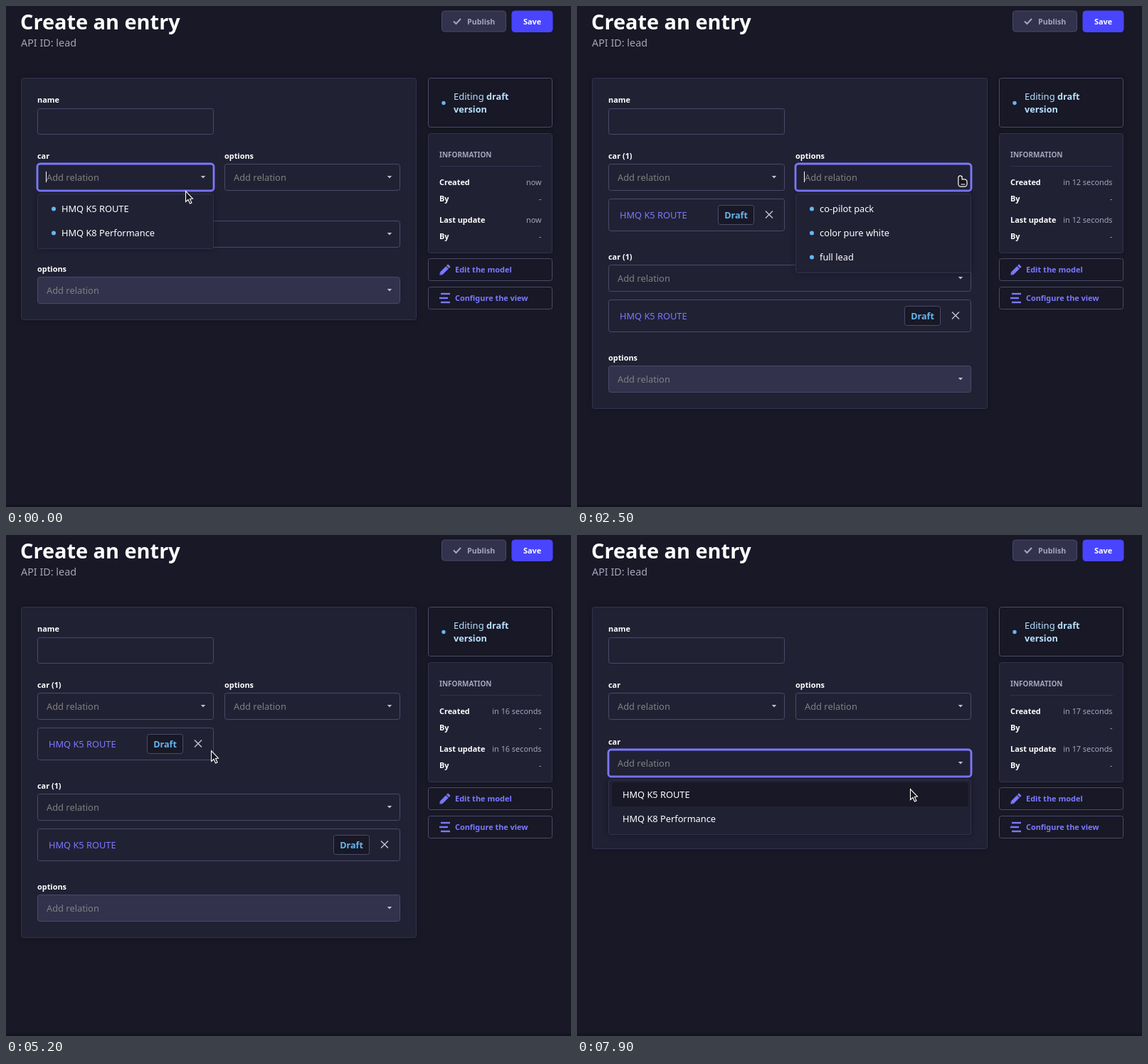
An HTML page with a canvas for the animation above (8000 ms loop, 794 by 705 pixels).

```html
<!DOCTYPE html>
<html lang="en">
<head>
<meta charset="utf-8">
<title>Create an entry</title>
<style>
html, body { margin: 0; width: 100%; height: 100%; overflow: hidden; background: #181826; }
canvas { display: block; }
</style>
</head>
<body>
<canvas id="stage" width="794" height="705"></canvas>
<script>
const ctx = document.getElementById('stage').getContext('2d');
const LOOP = 8000, STEP = 100, GLIDE = 500;
const C = {
  page: '#181826', card: '#212134', line: '#32324d', edge: '#4a4a6a', hint: '#808080',
  soft: '#a5a5ba', icon: '#c0c0cf', white: '#ffffff', violet: '#7b79ff', blue: '#66b7f1',
  save: '#4945ff', pale: '#b8e1ff', ink: '#16161c'
};
const CARS = ['HMQ K5 ROUTE', 'HMQ K8 Performance'];
const OPTIONS = ['co-pilot pack', 'color pure white', 'full lead'];

// Form grid
const LEFT = 44, SECOND = 307, RIGHT = 554, TOP = 222;
const FIELD_H = 38, ROW = 79.5, CHIP_ROW = 62.5, CHIP_DROP = 49, ITEM_H = 34;

// Moments of the clicks
const PICK_CAR = 600, OPEN_OPTIONS = 2300, PICK_OPTION = 3400,
      DROP_OPTION = 4500, DROP_CAR = 5600, OPEN_CAR = 7300;

// Where the pointer comes to rest, and when
const STOPS = [
  { at: 0, x: 252, y: 260 },
  { at: PICK_CAR, x: 200, y: 287 },
  { at: 1100, x: 315, y: 293 },
  { at: 1400, x: 505, y: 246 },
  { at: OPEN_OPTIONS, x: 539, y: 240 },
  { at: PICK_OPTION, x: 420, y: 318 },
  { at: 4100, x: 529, y: 304 },
  { at: DROP_OPTION, x: 533, y: 295 },
  { at: 5200, x: 288, y: 303 },
  { at: DROP_CAR, x: 271, y: 293 },
  { at: 6500, x: 513, y: 318 },
  { at: OPEN_CAR - 200, x: 539, y: 322 },
  { at: 7900, x: 468, y: 357 }
];

const within = (v, from, to) => v >= from && v < to;

function pointerAt(t) {
  const next = STOPS.findIndex(s => s.at > t);
  if (next < 0) return STOPS[STOPS.length - 1];
  const a = STOPS[next - 1], b = STOPS[next];
  const span = Math.min(GLIDE, b.at - a.at);
  const u = Math.max(0, 1 - (b.at - t) / span);
  const k = 1 - (1 - u) ** 3;
  return { x: a.x + (b.x - a.x) * k, y: a.y + (b.y - a.y) * k };
}

function layout(car, option) {
  const step = ROW + (car ? CHIP_ROW : 0);
  const row = n => Math.round(TOP + n * step);
  return [
    { id: 'car', name: 'car', x: LEFT, y: row(0), w: 248, filled: car },
    { id: 'options', name: 'options', x: SECOND, y: row(0), w: RIGHT - SECOND, filled: option, narrow: true },
    { id: 'car2', name: 'car', x: LEFT, y: row(1), w: RIGHT - LEFT, filled: car },
    { id: 'options2', name: 'options', x: LEFT, y: row(2), w: RIGHT - LEFT, filled: option, disabled: true }
  ];
}

function stateAt(t) {
  const car = within(t, PICK_CAR, DROP_CAR);
  const option = within(t, PICK_OPTION, DROP_OPTION);
  const fields = layout(car, option);
  const focus = t < OPEN_OPTIONS ? 'car' : t < DROP_OPTION ? 'options' : t >= OPEN_CAR ? 'car2' : '';
  const closed = within(t, PICK_CAR, OPEN_OPTIONS) || within(t, PICK_OPTION, OPEN_CAR);
  const since = [OPEN_CAR, PICK_OPTION, OPEN_OPTIONS, PICK_CAR, 0].find(s => t >= s);
  const seconds = t < PICK_OPTION ? 12 : 15 + (t >= DROP_OPTION) + (t >= DROP_CAR);
  return {
    fields, option, focus,
    open: closed ? null : fields.find(f => f.id === focus),
    caret: (t - since) % 1000 < 500,
    age: t < PICK_CAR ? 'now' : `in ${seconds} seconds`,
    pointer: pointerAt(t)
  };
}

function text(str, x, y, size, color, weight = 400, align = 'left') {
  ctx.font = `${weight} ${size}px "Noto Sans", sans-serif`;
  ctx.textAlign = align;
  ctx.fillStyle = color;
  ctx.fillText(str, x, y);
}

const label = (str, x, y) => text(str, x, y, 10.9, C.white, 700);

// The outline lies inside the given size
function box(x, y, w, h, fill, stroke, r = 3, shadow = 0) {
  ctx.save();
  ctx.shadowColor = `rgba(3,3,5,${shadow})`;
  ctx.shadowBlur = shadow ? 8 : 0;
  ctx.beginPath();
  ctx.roundRect(x + .5, y + .5, w - 1, h - 1, r);
  ctx.fillStyle = fill;
  ctx.fill();
  ctx.restore();
  ctx.strokeStyle = stroke;
  ctx.lineWidth = 1;
  ctx.stroke();
}

function dot(x, y, r, color) {
  ctx.fillStyle = color;
  ctx.beginPath();
  ctx.arc(x, y, r, 0, Math.PI * 2);
  ctx.fill();
}

function bar(x, y, w, h, color) {
  ctx.fillStyle = color;
  ctx.fillRect(x, y, w, h);
}

function shape(points, fill, stroke, width = 1) {
  ctx.beginPath();
  points.forEach(([x, y]) => ctx.lineTo(x, y));
  if (fill) { ctx.closePath(); ctx.fillStyle = fill; ctx.fill(); }
  if (stroke) { ctx.strokeStyle = stroke; ctx.lineWidth = width; ctx.stroke(); }
}

function at(x, y, paint, angle = 0) {
  ctx.save();
  ctx.translate(x, y);
  ctx.rotate(angle);
  paint();
  ctx.restore();
}

function cross() {
  for (const side of [-5, 5]) shape([[side, -5], [-side, 5]], null, C.icon, 1.5);
}

function grip() {
  for (let i = 0; i < 6; i++) bar(i % 2 * 5, (i >> 1) * 4.5, 2.6, 2.6, C.soft);
}

function pencil() {
  bar(-7, -2.5, 12, 5, C.violet);
  bar(6, -2.5, 3, 5, C.violet);
  shape([[-7, -2.5], [-10, 0], [-7, 2.5]], C.violet);
}

function lines() {
  for (let i = -1; i < 2; i++) bar(i ? -5 : -7, i * 6 - 1.2, i ? 13 : 12, 2.4, C.violet);
}

function select(f, s) {
  const focused = s.focus === f.id;
  label(f.name + (f.filled ? ' (1)' : ''), f.x, f.y - 7.5);
  box(f.x, f.y, f.w, FIELD_H, f.disabled ? C.line : C.card, C.edge);
  if (focused) {
    ctx.beginPath();
    ctx.roundRect(f.x, f.y, f.w, FIELD_H, 4);
    ctx.strokeStyle = C.violet;
    ctx.lineWidth = 2.8;
    ctx.stroke();
  }
  text('Add relation', f.x + 13, f.y + 23.5, 12.85, C.hint);
  at(f.x + f.w - 15, f.y + 17, () => shape([[-3.2, 0], [3.2, 0], [0, 3.6]], C.icon));
  if (focused && s.caret) bar(f.x + 12, f.y + 11, 1, 15, C.white);
}

function menu(f, pointer) {
  const items = f.name === 'car' ? CARS : OPTIONS;
  const dots = f.id !== 'car2';
  box(f.x, f.y + 42, f.w, items.length * ITEM_H + 10, C.card, C.line, 3, .4);
  items.forEach((item, i) => {
    const cy = f.y + 63 + i * ITEM_H;
    const over = Math.abs(pointer.y - cy) < ITEM_H / 2 && within(pointer.x, f.x, f.x + f.w);
    if (over) box(f.x + 5, cy - ITEM_H / 2, f.w - 9, ITEM_H, C.page, C.page);
    if (dots) dot(f.x + 23, cy + .5, 3, C.blue);
    text(item, f.x + (dots ? 34 : 20), cy + 5, 12.8, C.white);
  });
}

function chip(f) {
  const drag = f.name === 'options';
  const y = f.y + CHIP_DROP, h = drag ? 47 : 46, cy = Math.round(y + h / 2);
  // The narrow draggable row runs past its column and is cut off
  const w = f.w + (f.narrow ? 1 : 0), right = f.x + w;
  ctx.save();
  ctx.beginPath();
  ctx.rect(f.x, y, f.w, h);
  ctx.clip();
  box(f.x, y, w, h, f.disabled ? C.line : C.card, C.edge);
  if (drag) at(f.x + 19, cy - 6, grip);
  text(drag ? OPTIONS[1] : CARS[0], f.x + (drag ? 41 : 16), cy + 4.5, 12.8, C.violet);
  box(right - 94, cy - 14, 51, 28, C.page, C.edge);
  text('Draft', right - 68.5, cy + 4.5, 12.6, C.blue, 700, 'center');
  at(right - 22, cy - .5, cross);
  ctx.restore();
}

function header() {
  text('Create an entry', 20, 33, 28.9, C.white, 700);
  text('API ID: lead', 21, 57, 14.35, C.soft);
  box(612, 6.5, 91, 30, C.line, C.edge, 4);
  at(634, 22, () => shape([[-5, -.5], [-1.5, 3], [5, -4]], null, C.soft, 2));
  text('Publish', 648, 25.5, 10.7, C.soft, 700);
  box(710.5, 6.5, 58, 30.5, C.save, C.save, 4);
  text('Save', 739.5, 25.5, 10.9, C.white, 700, 'center');
}

function sidebar(age) {
  const x = 593, w = 175, inner = 609, end = 752.5;
  box(x, 101, w, 70, C.page, C.edge, 3, .2);
  dot(615, 136.5, 2.7, C.blue);
  text('Editing', 629, 131.5, 13, C.pale);
  text('draft', 675, 131.5, 12.7, C.pale, 700);
  text('version', 629, 150, 12.7, C.pale, 700);

  box(x, 179, w, 169, C.card, C.line, 3, .2);
  text('INFORMATION', inner, 213, 10, C.soft, 700);
  bar(inner, 225, 144, 1, C.line);
  ['Created', 'Last update'].forEach((name, i) => {
    const y = 252 + i * 53;
    label(name, inner, y);
    text(age, end, y, 10.85, C.soft, 400, 'right');
    label('By', inner, y + 23);
    text('-', end, y + 23, 10.85, C.soft, 400, 'right');
  });

  box(x, 355, w, 32, C.page, C.edge);
  at(616.5, 371.5, pencil, -Math.PI / 4);
  text('Edit the model', 631, 375, 11, C.violet, 700);
  box(x, 395, w, 32, C.page, C.edge);
  at(616, 411, lines);
  text('Configure the view', 631, 415, 10.9, C.violet, 700);
}

function form(s) {
  const last = s.fields[3];
  box(21, 101, 556, last.y - 40 + (s.option ? CHIP_ROW : 0), C.card, C.line, 3, .2);
  label('name', LEFT, 136);
  box(LEFT, 144, 248, 37, C.card, C.edge);
  s.fields.forEach(f => {
    select(f, s);
    if (f.filled) chip(f);
  });
  if (s.open) menu(s.open, s.pointer);
}

function pointerKind({ fields, open, pointer: { x, y } }) {
  if (open && y > open.y + FIELD_H) return 'arrow';
  const f = fields.find(f => within(x, f.x, f.x + f.w) && within(y, f.y, f.y + FIELD_H));
  if (f) return x > f.x + f.w - 25 ? 'hand' : 'beam';
  const row = fields.find(f => f.filled && within(x, f.x, f.x + f.w)
    && within(y - f.y - CHIP_DROP, 0, 47));
  if (!row) return 'arrow';
  const overCross = Math.hypot(x - (row.x + row.w - 22), y - row.y - CHIP_DROP - 23) < 8;
  return overCross ? 'hand' : row.name === 'options' ? 'move' : 'arrow';
}

const POINTERS = {
  arrow() {
    shape([[0, 0], [0, 15], [3.5, 12], [6, 17.5], [8.5, 16.5], [6, 11], [10, 10.5]], C.ink, C.white, 1.1);
  },
  beam() {
    for (const [color, width] of [[C.white, 3], [C.ink, 1]]) {
      shape([[0, -8], [0, 8]], null, color, width);
      for (const y of [-7.5, 7.5]) shape([[-3, y], [3, y]], null, color, width);
    }
  },
  hand() {
    ctx.beginPath();
    ctx.roundRect(-3, -1, 4, 10, 2);
    ctx.roundRect(-3, 4, 11, 9, 3);
    ctx.strokeStyle = C.white;
    ctx.lineWidth = 2.4;
    ctx.stroke();
    ctx.fillStyle = C.ink;
    ctx.fill();
    bar(0, 10, 6, 1, C.white);
  },
  move() {
    const star = Array.from({ length: 8 }, (_, i) => {
      const r = i % 2 ? 6.4 : 9.5, a = i * Math.PI / 4;
      return [r * Math.cos(a), r * Math.sin(a)];
    });
    shape(star, C.ink, C.white, 1.1);
    [C.white, C.ink, C.white].forEach((color, i) => dot(0, 0, 3.2 - i * 1.1, color));
  }
};

function draw(t) {
  const s = stateAt(t);
  bar(0, 0, 794, 705, C.page);
  bar(0, 702, 794, 3, '#141420');
  header();
  sidebar(s.age);
  form(s);
  at(Math.round(s.pointer.x) + .5, Math.round(s.pointer.y) + .5, POINTERS[pointerKind(s)]);
}

const start = performance.now();
function tick() {
  const t = (performance.now() - start) % LOOP;
  draw(Math.floor(t / STEP) * STEP);
  requestAnimationFrame(tick);
}
tick();
</script>
</body>
</html>
```
